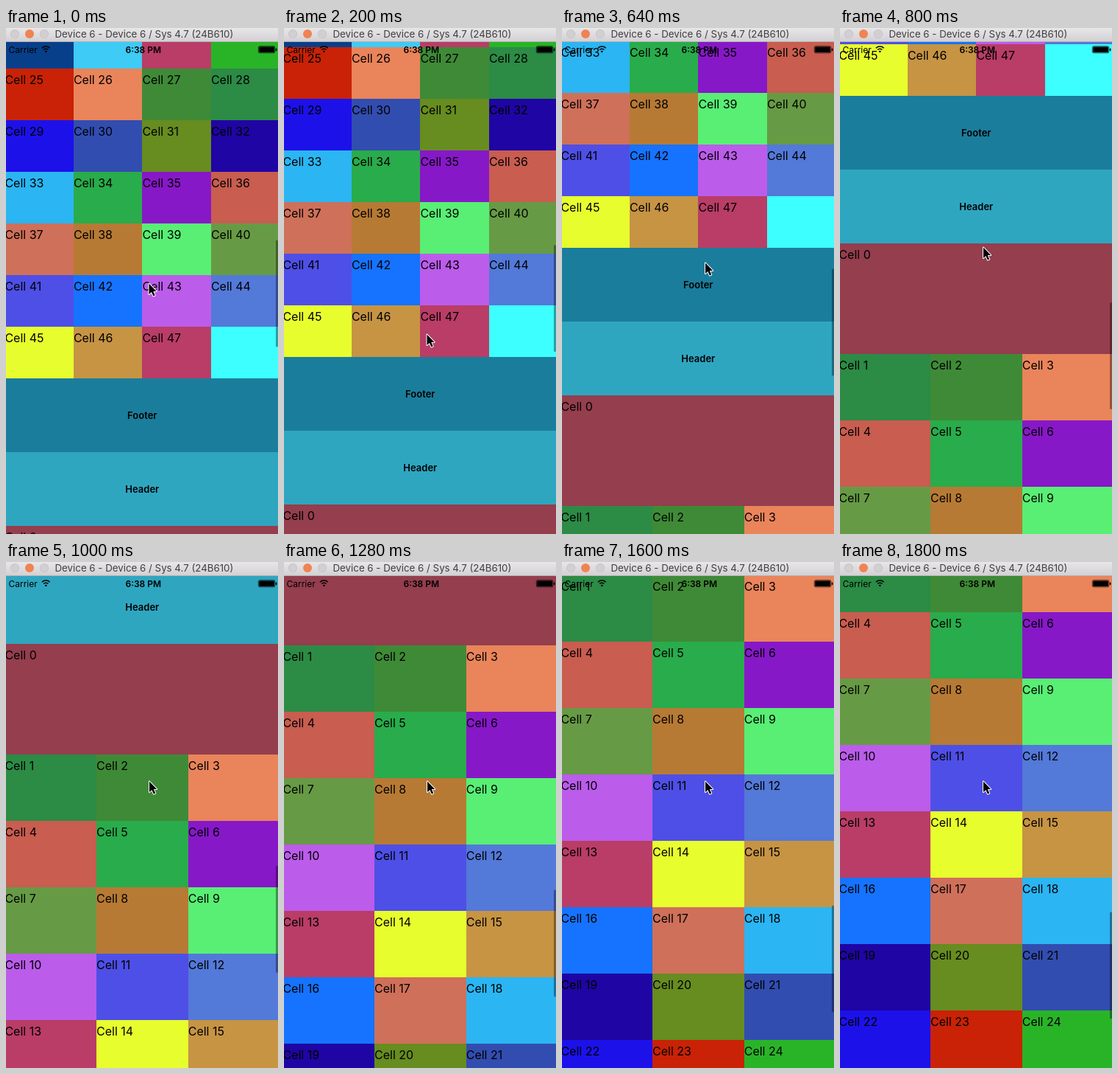
An HTML page with a canvas that plays this animation: 370x686 px, repeating every 1840 ms.

```html
<!DOCTYPE html>
<html lang="en">
<head>
<meta charset="utf-8">
<title>Scrolling grid</title>
<style>
html, body { margin: 0; width: 100%; height: 100%; overflow: hidden; background: #3effff; }
canvas { display: block; width: 370px; height: 686px; }
</style>
</head>
<body>
<canvas id="stage" width="370" height="686"></canvas>
<script>
const W = 370, H = 686, LOOP = 1840, STEP = 40;
const ctx = document.getElementById('stage').getContext('2d');
const FONT = 'Inter, Roboto, sans-serif';
const LEFT = -1.6, FULL = 374;

const COLORS = ('943e4e 2c8b45 3f8a37 ea845b c85d50 29ac4b 8718c8 679a45 b77a34 58ef74 ' +
  'bb5ceb 4e4fe6 5379d9 b93d66 e8fd2e c69443 1673ff cf705a 2bb5f3 1f05a3 ' +
  '678c1f 324db0 1d11ea c92206 29b428 083f8a 3ecbf6').split(' ').map(c => '#' + c);
// Palette index of cells 21 to 47 in the four column section
const NARROW = [25, 26, 13, 24, 23, 3, 2, 1, 22, 21, 20, 19, 18, 5, 6, 4,
  17, 8, 9, 7, 11, 16, 10, 12, 14, 15, 13];

// Keys: time, value, speed per ms
const SCROLL = [[0, 0, .165], [440, 48, .03], [640, 177, 1.5], [1000, 564, .74],
  [1280, 712, .42], [1440, 766, .28], [1840, 853, .15]];
const POINTER = [[0, 346, .1], [200, 415, .5], [400, 468, 0], [440, 467, -.15],
  [540, 405, -.95], [640, 318, -.6], [740, 297, 0], [1840, 297, 0]];

function curve(keys, t) {
  let i = 0;
  while (i < keys.length - 2 && t >= keys[i + 1][0]) i++;
  const [t0, a, va] = keys[i], [t1, b, vb] = keys[i + 1];
  const d = t1 - t0, u = (t - t0) / d, w = 1 - u;
  return a * w * w * (1 + 2 * u) + b * u * u * (3 - 2 * u) +
    d * (va * u * w * w - vb * u * u * w);
}

function rect(x, y, w, h, color) {
  ctx.fillStyle = color;
  ctx.fillRect(x, y, w, h);
}

function text(str, x, y, size, weight = 400, align = 'left', color = '#000') {
  ctx.font = `${weight} ${size}px ${FONT}`;
  ctx.textAlign = align;
  ctx.fillStyle = color;
  ctx.fillText(str, x, y);
}

function disc(x, y, r, color) {
  ctx.fillStyle = color;
  ctx.beginPath();
  ctx.arc(x, y, r, 0, 7);
  ctx.fill();
}

function pill(x, y, w, h, r, color) {
  ctx.fillStyle = color;
  ctx.beginPath();
  ctx.roundRect(x, y, w, h, r);
  ctx.fill();
}

function cell(n, col, cols, y, h, color) {
  if (y > H || y + h < 0) return;
  const x = LEFT + col * FULL / cols;
  const a = Math.round(x), b = Math.round(x + FULL / cols);
  rect(a, y, b - a, h, color);
  text('Cell ' + n, x, y + 21, 16);
}

function banner(label, y, color) {
  rect(0, y, W, 100, color);
  text(label, 185.3, y + 55, 13, 600, 'center');
}

function grid(footer) {
  rect(0, 0, W, H, '#3effff');
  NARROW.forEach((c, i) =>
    cell(21 + i, i % 4, 4, footer - 490 + 70 * Math.floor(i / 4), 70, COLORS[c]));
  banner('Footer', footer, '#1b7d9c');
  banner('Header', footer + 100, '#2fa6c0');
  cell(0, 0, 1, footer + 200, 150, COLORS[0]);
  for (let n = 1; n < 25; n++) {
    const i = n - 1;
    cell(n, i % 3, 3, footer + 350 + 90 * Math.floor(i / 3), 90, COLORS[n]);
  }
}

function statusBar() {
  text('Carrier', 3.5, 33.5, 12);
  text('6:38 PM', 186.8, 33.5, 12, 600, 'center');
  ctx.strokeStyle = '#000';
  ctx.lineWidth = 1.6;
  for (const r of [4.4, 7.6]) {
    ctx.beginPath();
    ctx.arc(54.3, 32.6, r, -Math.PI * .75, -Math.PI * .25);
    ctx.stroke();
  }
  ctx.fillStyle = '#000';
  ctx.beginPath();
  ctx.moveTo(54.3, 33.6);
  ctx.arc(54.3, 33.2, 2.4, -Math.PI * .75, -Math.PI * .25);
  ctx.fill();
  ctx.lineWidth = .7;
  ctx.beginPath();
  ctx.roundRect(343.3, 24.7, 22.6, 9.2, 2);
  ctx.stroke();
  pill(344.2, 25.6, 20.8, 7.4, 1, '#000');
  pill(366.8, 27.6, 1.6, 3.6, .8, '#000');
}

function titleBar() {
  const g = ctx.createLinearGradient(0, 0, 0, 18);
  g.addColorStop(0, '#e8e6e8');
  g.addColorStop(1, '#d3d1d3');
  rect(0, 0, W, 18, g);
  rect(0, 18, W, 1, '#b5b3b5');
  disc(12, 8, 6, '#c3c1c3');
  disc(12, 8, 5.2, '#d1cfd1');
  disc(32, 8, 6, '#f08352');
  disc(52, 8, 6, '#c3c1c3');
  disc(52, 8, 5.2, '#d1cfd1');
  text('Device 6 - Device 6 / Sys 4.7 (24B610)', 66.5, 13, 13.3, 400, 'left', '#403f40');
}

function ring(x, y) {
  for (const [w, color] of [[5.6, '#fff'], [3.4, '#000']]) {
    ctx.lineWidth = w;
    ctx.strokeStyle = color;
    ctx.beginPath();
    ctx.arc(x, y, 20.7, 0, 7);
    ctx.stroke();
  }
}

function arrow(x, y) {
  const pts = [[0, 0], [0, 14.5], [3.4, 11.4], [5.9, 17], [8.2, 16], [5.8, 10.6], [10.2, 10.4]];
  ctx.beginPath();
  pts.forEach(([px, py]) => ctx.lineTo(x + px, y + py));
  ctx.closePath();
  ctx.lineWidth = 2;
  ctx.lineJoin = 'round';
  ctx.strokeStyle = '#fff';
  ctx.stroke();
  ctx.fillStyle = '#000';
  ctx.fill();
}

function draw(t) {
  const s = Math.round(curve(SCROLL, t));
  const x = t < 600 ? 194.5 : 195;
  const y = curve(POINTER, t);
  grid(475 - s);
  pill(367, 287.5 + s * .2205, 3, 145, 1.5, 'rgba(0,0,0,.36)');
  statusBar();
  titleBar();
  if (t >= 400 && t < 600) ring(x + .5, y + 2);
  arrow(x, y + .5);
}

function tick(now) {
  draw(Math.floor((now - start) % LOOP / STEP) * STEP);
  requestAnimationFrame(tick);
}

const start = performance.now();
draw(0);
requestAnimationFrame(now => tick(Math.max(now, start)));
</script>
</body>
</html>
```
